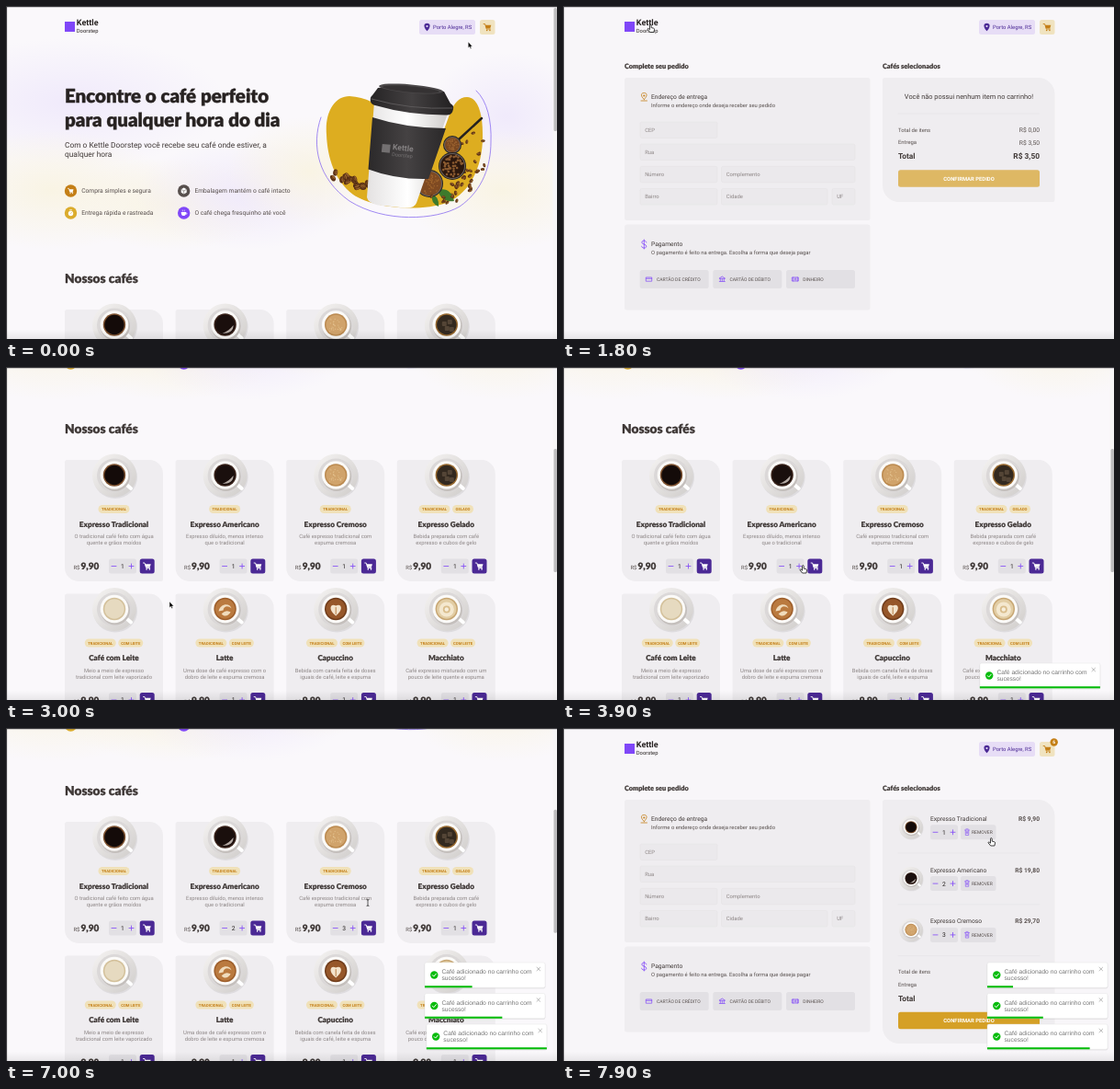
Write an HTML page that moves like this. It is 600 px wide and 362 px high and loops after 8000 ms.

```html
<!DOCTYPE html>
<html lang="pt-BR">
<head>
<meta charset="utf-8">
<title>Kettle Doorstep</title>
<style>
html, body { margin: 0; width: 100%; height: 100%; overflow: hidden; background: #faf8fb }
svg { display: block; width: 100vw; height: 100vh; font-family: Roboto, sans-serif; text-rendering: geometricPrecision }
text { white-space: pre }
.h { font-family: Lato, sans-serif; font-weight: 900; stroke: #272221; stroke-width: .02em; stroke-linejoin: round }
.b { font-weight: 700 }
.m { text-anchor: middle }
.e { text-anchor: end }
.toast text { font-family: "Liberation Sans", Arial, sans-serif }
</style>
</head>
<body>
<svg id="stage" viewBox="0 0 600 362"></svg>
<script>
const TITLE = '#272221', SUB = '#403937', TEXT = '#574f4d', LABEL = '#8d8686',
  PURPLE = '#8047f8', DEEP = '#4b2995', AMBER = '#c47f17', GOLD = '#dbac2c',
  CARD = '#efedf0', BUTTON = '#e2e0e4';

// Drawing helpers
const rect = (x, y, w, h, fill, r = 2.5, more = '') =>
  `<rect x="${x}" y="${y}" width="${w}" height="${h}" rx="${r}" fill="${fill}" ${more}/>`;
const text = (x, y, s, size, fill = TEXT, cls = '') =>
  `<text x="${x}" y="${y}" font-size="${size}" fill="${fill}" class="${cls}">${s}</text>`;
const oval = (x, y, rx, ry, fill, more = '') =>
  `<ellipse cx="${x}" cy="${y}" rx="${rx}" ry="${ry}" fill="${fill}" ${more}/>`;
const dot = (x, y, r, fill, more) => oval(x, y, r, r, fill, more);
const path = (d, fill, more = '') => `<path d="${d}" fill="${fill}" ${more}/>`;
const line = (d, color, w = .8) => path(d, 'none', `stroke="${color}" stroke-width="${w}" stroke-linecap="round" stroke-linejoin="round"`);
const group = (move, body, more = '') => `<g transform="${move}" ${more}>${body}</g>`;
const leafCard = (x, y, w, h, r) =>
  path(`M${x + 2.5} ${y}H${x + w - r}a${r} ${r} 0 0 1 ${r} ${r}V${y + h - 2.5}a2.5 2.5 0 0 1-2.5 2.5H${x + r}a${r} ${r} 0 0 1-${r}-${r}V${y + 2.5}a2.5 2.5 0 0 1 2.5-2.5z`, CARD);

let seed = 7;
const rnd = (a, b) => a + (b - a) * ((seed = seed * 16807 % 2147483647) / 2147483647);

// Icons, centred on x, y
const basket = (x, y, c, k = 1) => group(`translate(${x} ${y}) scale(${k})`,
  line('M-4.2-3.5h1.5l1.7 5.5h4', c, .9) + path('M-2.4-2.3h6.4l-1 3.6h-4.4z', c) +
  dot(-.6, 3.4, .8, c) + dot(2.6, 3.4, .8, c));
const pin = (x, y, c, hole) => path(`M${x} ${y + 4.2}c-4.2-4-4-8.4 0-8.4s4.2 4.4 0 8.4z`, c) + dot(x, y - 1, 1.1, hole);
const box = (x, y) => path(`M${x} ${y - 3.4}l3 1.7v3.4l-3 1.7-3-1.7v-3.4z`, '#fff') + line(`M${x - 2.8} ${y - 1.6}l2.8 1.6 2.8-1.6M${x} ${y}v3`, TEXT, .5);
const timer = (x, y) => dot(x, y + .5, 2.7, '#fff') + line(`M${x - 1} ${y - 3.2}h2`, '#fff') + line(`M${x} ${y + .5}l1-1.2`, GOLD, .6);
const mug = (x, y) => path(`M${x - 3} ${y - 1}h5.4c0 2.6-1 4-2 4h-1.4c-1 0-2-1.4-2-4z`, '#fff') +
  line(`M${x + 2.3} ${y}h1v1.2h-1.4M${x - 1.4} ${y - 3}v1M${x + .6} ${y - 3}v1`, '#fff', .6);

const logo = x => rect(x, 17, 11, 11, PURPLE, 0) + text(x + 12.8, 21.3, 'Kettle', 9, TITLE, 'b') + text(x + 12.8, 29.2, 'Doorstep', 5.8, TITLE);
const header = x => logo(x) +
  rect(x + 386, 15, 61, 16, '#e7ddf6') + pin(x + 394.5, 23, DEEP, '#e7ddf6') + text(x + 401, 25.2, 'Porto Alegre, RS', 5.86, DEEP) +
  rect(x + 452, 15, 16.5, 16, '#f0e3c0') + basket(x + 460.3, 23, AMBER) +
  `<g class="full">${dot(x + 467.7, 15.5, 4.2, AMBER) + text(x + 467.7, 17.2, '6', 5, '#fff', 'b m')}</g>`;

const counter = (x, y, n, id = '') => rect(x, y, 30, 16, BUTTON) +
  line(`M${x + 3} ${y + 8}h5M${x + 22} ${y + 8}h5m-2.5-2.5v5`, PURPLE, .8) +
  `<g ${id}>${text(x + 15, y + 10.4, n, 6.7, TITLE, 'm')}</g>`;

// Coffee seen from above: liquid, crema edge, surface detail
const art = {
  foam: () => Array.from({ length: 30 }, () => dot(rnd(-7, 7), rnd(-7, 7), .6, '#e2bf8c')).join(''),
  ice: () => [[-5, -4], [1, -6], [-2, 1], [3, 2]].map(([x, y]) => rect(x, y, 5, 5, '#86705a', 1, 'opacity=".4"')).join(''),
  heart: () => path('M0 7C-9 0-6-7 0-4 6-7 9 0 0 7z', '#f3e4cd') + line('M0 5v-7', '#b77a43', 1),
  swirl: () => path('M-7 2C-6-6 5-8 7-1 3-5-2-3-2 1z', '#f0dcbd') + path('M-4 5C1 0 4 2 6 3 3 8-1 8-4 5z', '#f0dcbd'),
  rings: () => dot(0, 0, 8, '#f4e8cf') + dot(0, 0, 4, '#d9bd8c') + dot(0, 0, 2.2, '#f7eedb'),
  shine: () => path('M9 0C9 6 5 9-3 9 2 7 6 4 9 0z', '#b5aaa4')
};
const coffee = (x, y, k, [liquid, edge, detail]) => group(`translate(${x} ${y}) scale(${k})`,
  oval(1, 2, 24, 23, '#000', 'opacity=".07"') + oval(0, 0, 24, 23.5, 'url(#dish)') +
  oval(0, 0, 19, 18.5, '#dbd8d8') + line('M11 8L18 14', '#fff', 4) + dot(1, 1, 16, '#c4bfbc') + dot(0, -.5, 15.3, '#fbfaf8') +
  dot(0, -.5, 12.2, edge) + dot(0, -.5, 10.7, liquid) + (detail ? art[detail]() : ''));

const milk = ['TRADICIONAL', 'COM LEITE'], plain = ['TRADICIONAL'];
const tagWidth = { TRADICIONAL: 34, 'COM LEITE': 27, GELADO: 23 };
const products = [
  ['Expresso Tradicional', 'O tradicional café feito com água', 'quente e grãos moídos', plain, ['#140b09', '#7d5231']],
  ['Expresso Americano', 'Expresso diluído, menos intenso', 'que o tradicional', plain, ['#1a0f0d', '#38221a', 'shine']],
  ['Expresso Cremoso', 'Café expresso tradicional com', 'espuma cremosa', plain, ['#d0a36b', '#bb8a50', 'foam']],
  ['Expresso Gelado', 'Bebida preparada com café', 'expresso e cubos de gelo', ['TRADICIONAL', 'GELADO'], ['#33291f', '#96682f', 'ice']],
  ['Café com Leite', 'Meio a meio de expresso', 'tradicional com leite vaporizado', milk, ['#e6dac0', '#d3c09a']],
  ['Latte', 'Uma dose de café expresso com o', 'dobro de leite e espuma cremosa', milk, ['#ba7a3f', '#9d5e2b', 'swirl']],
  ['Capuccino', 'Bebida com canela feita de doses', 'iguais de café, leite e espuma', milk, ['#96572a', '#6f3c1b', 'heart']],
  ['Macchiato', 'Café expresso misturado com um', 'pouco de leite quente e espuma', milk, ['#e2cda4', '#c7a673', 'rings']]
];

function product([name, l1, l2, tags, look], i) {
  const x = 64 + i % 4 * 120.6, y = 330 + (i > 3) * 145.5, c = x + 53.5;
  let left = c - (tags.reduce((w, t) => w + tagWidth[t], 0) + 2.5 * (tags.length - 1)) / 2;
  const pills = tags.map(t => {
    const w = tagWidth[t], pill = rect(left, y + 49, w, 9, '#f0e1b9', 4.5) + text(left + w / 2, y + 55, t, 4.2, AMBER, 'b m');
    left += w + 2.5;
    return pill;
  }).join('');
  return leafCard(x, y, 107, 132, 15) + coffee(c + .5, y + 17, 1, look) + pills +
    text(c, y + 72.8, name, 8.2, SUB, 'h m') +
    text(c, y + 85, l1, 5.86, LABEL, 'm') + text(c, y + 92.3, l2, 5.86, LABEL, 'm') +
    text(x + 9.5, y + 119, 'R$', 5.86) + text(x + 17.5, y + 119, '9,90', 10, SUB, 'h') +
    counter(x + 48, y + 107.5, 1, `id="qty${i}"`) +
    rect(x + 81.7, y + 107.5, 16, 16, DEEP) + basket(x + 89.7, y + 115.5, '#fff');
}

const bean = (x, y, k) => group(`translate(${x} ${y}) rotate(${rnd(0, 180)}) scale(${k})`,
  oval(0, 0, 3.6, 2.5, '#5f3417') + oval(-.3, -.6, 2.6, 1.3, '#a0682f') + line('M-3 .2q3-1.2 6 0', '#3b1d0d', .6));
const beans = (n, x0, y0, x1, y1, slope, k = 1) => Array.from({ length: n }, () => {
  const u = rnd(0, 1);
  return bean(x0 + u * (x1 - x0), y0 + rnd(0, y1 - y0) + u * slope, k);
}).join('');
const bowl = (x, y, r, base, grain, size) => dot(x, y, r, '#252120') + dot(x, y, r - 1, '#6d645f') + dot(x, y, r - 2, base) +
  Array.from({ length: 40 }, () => {
    const a = rnd(0, 6.28), d = (r - 3.5) * Math.sqrt(rnd(0, 1));
    return dot(x + d * Math.cos(a), y + d * Math.sin(a), size, grain);
  }).join('');

const hero = () =>
  path('M349 140C347 115 358 98 374 98 392 99 405 106 420 120L474 140C482 128 484 99 502 99 514 99 519 118 519 138 520 170 508 202 480 214 450 224 400 220 378 205 358 190 350 165 349 140z', '#ddad20') +
  line('M343 121C332 152 340 188 374 212 412 236 468 233 494 218 520 200 528 172 528 148 529 125 524 103 512 92', '#8a6cf0') +
  beans(20, 356, 177, 402, 188, 18) + beans(14, 484, 186, 508, 206, -4, .7) + beans(16, 496, 138, 522, 184, 0, .6) +
  line('M492 146L518 122', '#252120', 2.5) + bowl(486, 151, 10, '#7a4720', '#9a6230', .8) +
  path('M470 200q14-4 18 12-14 2-18-12zM464 205q8 2 7 13-9-4-7-13z', '#3d7a2c') +
  bowl(486, 174, 15, '#2c180e', '#8a5a30', 1.3) + bowl(461, 193, 15, '#7f4a22', '#a2672f', .8) + beans(7, 462, 206, 492, 214, 0, .6) +
  path('M401 104L393 208Q394 214 405 216.500L434 219.500Q445 220 447 214L482 114z', 'url(#paper)') +
  path('M399 121Q436 133 479 133L460 188Q425 189 394.500 177.500z', 'url(#sleeve)') +
  path('M405 89L399 97Q396 99 397 104 398 107 402 108 440 119 481 118.500 486 118 487 112 488 108 484 106L477 93Q440 84 405 89z', 'url(#lid)') +
  group('rotate(5 441 90)', oval(441, 90, 35, 4.6, '#4b4849') + oval(441, 90.6, 31, 3.2, '#353233')) +
  line('M398 101Q440 113 486 111', '#5c595a', 1) +
  group('translate(411 148) rotate(6)', rect(-1, 2, 9, 9, '#737071', 0) + text(10.500, 7, 'Kettle', 8.6, '#858283', 'b') + text(10.500, 14, 'Doorstep', 5.6, '#737071'));

const glow = (x, y, rx, ry, c) => oval(x, y, rx, ry, `url(#${c})`);
const feature = (x, y, c, icon, label) => dot(x, y, 6.7, c) + icon + text(x + 11.7, y + 2.4, label, 6.7);
const home = () =>
  glow(70, 105, 170, 70, 'lilac') + glow(50, 200, 130, 65, 'cream') + glow(180, 215, 120, 50, 'cream') +
  glow(260, 205, 120, 60, 'lilac') + glow(545, 120, 90, 70, 'lilac') + glow(540, 200, 110, 65, 'cream') + glow(330, 180, 90, 60, 'cream') +
  header(64) +
  text(64, 105, 'Encontre o café perfeito', 20.5, TITLE, 'h') + text(64, 131, 'para qualquer hora do dia', 20.5, TITLE, 'h') +
  text(64, 153.5, 'Com o Kettle Doorstep você recebe seu café onde estiver, a', 8.37, SUB) + text(64, 164.3, 'qualquer hora', 8.37, SUB) +
  feature(70.5, 201, AMBER, basket(70.5, 201, '#fff', .75), 'Compra simples e segura') +
  feature(193.7, 201, TEXT, box(193.7, 201), 'Embalagem mantém o café intacto') +
  feature(70.5, 225, GOLD, timer(70.5, 225), 'Entrega rápida e rastreada') +
  feature(193.7, 225, PURPLE, mug(193.7, 225), 'O café chega fresquinho até você') +
  hero() + text(64, 301, 'Nossos cafés', 13.7, SUB, 'h') + products.map(product).join('');

// Checkout page
const input = (x, y, w, label) => rect(x, y, w, 17.5, '#ebe9ec', 1.7, 'stroke="#e2e0e3" stroke-width=".5"') + text(x + 5.2, y + 10.8, label, 5.86, LABEL);
const method = (x, label, icon) => rect(x, 287, 75, 20, BUTTON) + group(`translate(${x + 10} 297)`, line(icon, PURPLE, .7)) + text(x + 18.3, 298.8, label, 5);
const rule = y => line(`M365 ${y}H519`, '#e1dfe2', .5);
const summary = (dy, items, total, fill) => group(`translate(0 ${dy})`,
  text(365, 136.6, 'Total de itens', 5.86) + text(519, 137.3, items, 6.7, TEXT, 'e') +
  text(365, 150, 'Entrega', 5.86) + text(519, 150.6, 'R$ 3,50', 6.7, TEXT, 'e') +
  text(365, 166, 'Total', 8.37, SUB, 'b') + text(519, 166, total, 8.37, SUB, 'b e') +
  rect(365, 178.3, 154, 18.5, fill) + text(442, 189.6, 'CONFIRMAR PEDIDO', 5.86, '#fff', 'b m'));
const cartItem = (i, price) => {
  const y = 78 + i * 55.8;
  return coffee(379, y + 30, .54, products[i][4]) + text(400, y + 22.7, products[i][0], 6.7, SUB) +
    text(519, y + 22.7, price, 6.7, TEXT, 'b e') + counter(400, y + 27.3, i + 1) + rect(433, y + 27.3, 38.5, 16, BUTTON) +
    line(`M437.500 ${y + 33}h5m-4.200 0v5.500h3.400v-5.500m-2.700-1.200h2m-1.600 2.800v2m1.200-2v2`, PURPLE, .6) +
    text(445, y + 37.2, 'REMOVER', 5) + rule(y + 58);
};
const checkout = () => header(67) +
  text(67, 68.4, 'Complete seu pedido', 7.35, SUB, 'h') + text(348, 68.4, 'Cafés selecionados', 7.35, SUB, 'h') +
  rect(67, 78, 267.5, 155, CARD) + rect(67, 237.5, 267.5, 93, CARD) +
  line('M88.300 101.500c-4-3.500-3.800-7 0-7s3.800 3.500 0 7zM85 103h6.500', AMBER, .8) + dot(88.3, 97.6, 1, AMBER) +
  text(96, 101.2, 'Endereço de entrega', 6.7, SUB) + text(96, 110.2, 'Informe o endereço onde deseja receber seu pedido', 5.86) +
  input(84, 126, 84, 'CEP') + input(84, 150, 234, 'Rua') + input(84, 174.3, 84, 'Número') + input(172.5, 174.3, 145.5, 'Complemento') +
  input(84, 198.5, 84, 'Bairro') + input(172.5, 198.5, 115.5, 'Cidade') + input(293, 198.5, 25, 'UF') +
  line('M90.800 257c0-2.600-5-2.600-5 0s5 1.600 5 4.200-5.200 2.600-5.200 0M88.300 254v10', PURPLE, .8) +
  text(96, 261.2, 'Pagamento', 6.7, SUB) + text(96, 270.4, 'O pagamento é feito na entrega. Escolha a forma que deseja pagar', 5.86) +
  method(83.7, 'CARTÃO DE CRÉDITO', 'M-3-2h6v4.200h-6zM-3-.7h6') +
  method(163.3, 'CARTÃO DE DÉBITO', 'M-3-1l3-2 3 2zM-2-.5v2.500M0-.5v2.500M2-.5v2.500M-3 2.500h6') +
  method(243, 'DINHEIRO', 'M-3.300-2h6.600v4h-6.600zM0-1a1 1 0 1 0 .1 0M-2.300-2v4M2.300-2v4') +
  `<g class="empty">${leafCard(348, 78, 187.5, 135, 18) + text(442, 101, 'Você não possui nenhum item no carrinho!', 7.4, SUB, 'm') +
    rule(117) + summary(0, 'R$ 0,00', 'R$ 3,50', '#deb864')}</g>` +
  `<g class="full">${leafCard(348, 78, 187.5, 265, 18) + ['R$ 9,90', 'R$ 19,80', 'R$ 29,70'].map((p, i) => cartItem(i, p)).join('') +
    summary(130.5, 'R$ 59,40', 'R$ 62,90', '#d5a026')}</g>`;

const toast = () => `<g class="toast">${rect(-.4, .5, 131.8, 28, '#000', 2.2, 'opacity=".07"') + rect(0, 0, 131, 27.3, '#fff', 1.7, 'stroke="#ddd" stroke-width=".4"') +
  dot(10.3, 13.5, 4.2, '#07bc0c') + line('M8.300 13.600l1.500 1.500 2.600-3', '#fff', 1) +
  text(18.5, 12, 'Café adicionado no carrinho com', 6.7, '#757575') + text(18.5, 19.3, 'sucesso!', 6.7, '#757575') +
  line('M122 5.200l3.600 3.600m0-3.600l-3.600 3.600', '#888', .6)}<rect y="25.200" height="2.100" fill="#07bc0c"/></g>`;

const radial = (id, c) => `<radialGradient id="${id}"><stop stop-color="${c}"/><stop offset="1" stop-color="${c}" stop-opacity="0"/></radialGradient>`;
const linear = (id, more, ...c) => `<linearGradient id="${id}" ${more}>${c.map((v, i) => `<stop offset="${i / (c.length - 1)}" stop-color="${v}"/>`).join('')}</linearGradient>`;
const down = 'x2="0" y2="1"';

stage.innerHTML = `<defs>${radial('lilac', '#f0eafb') + radial('cream', '#f9f4e4') +
  linear('dish', 'x2="1" y2="1"', '#f6f4f3', '#cfccca') + linear('paper', '', '#e4e2e2', '#fff', '#cfccca') +
  linear('sleeve', '', '#2b292a', '#454243', '#2a2829') + linear('lid', '', '#262425', '#434041', '#222021') +
  linear('fade', down, '#00000000', '#00000012')}</defs>
  ${rect(0, 0, 600, 362, '#faf8fb', 0)}
  <g id="home">${home()}</g>
  <g id="checkout">${rect(0, 0, 600, 362, '#f8f6f9', 0) + checkout()}</g>
  <g id="bar">${rect(595.5, 0, 4.5, 362, '#f7f6f7', 0)}<rect id="thumb" x="596.500" width="3.500" height="134" rx="1.500" fill="#bdbcbe"/></g>
  ${rect(0, 352, 600, 10, 'url(#fade)', 0)}
  ${toast().repeat(3)}
  ${rect(0, 0, 600, 1.2, '#3a393d', 0) + rect(0, 0, 1.1, 362, '#3a393d', 0)}
  <g id="cursor">
    <g>${path('M0 0v6.500l1.500-1.300 1 2.400 1.100-.5-1-2.200h2z', '#000', 'stroke="#fff" stroke-width=".4"')}</g>
    <g>${path('M-1.500-3.500a.8.800 0 0 1 1.700 0v2.600l2.500.6c.7.200.9.700.8 1.400l-.6 2.900h-4.200l-2.500-3c-.5-.8.400-1.400 1.100-.8l1.200 1z', '#fff', 'stroke="#111" stroke-width=".8"')}</g>
    <g>${line('M-1-3.500q1 0 1 .8 0-.8 1-.8M0-3v6M-1 3.500q1 0 1-.8 0 .8 1 .8', '#222', .7)}</g>
  </g>`;

// Timelines: [time, values...]
const scrollKeys = [[2400, 0], [2600, 62], [2800, 170], [3000, 229], [6900, 229], [7000, 228], [7250, 0]];
const cursorKeys = [[0, 503.3, 39], [400, 524, 24], [700, 524, 26], [1000, 450, 180], [1300, 260, 285], [1700, 96, 24.5], [2000, 96, 24.5],
  [2400, 203, 292], [2800, 203, 292], [3200, 153, 218], [3400, 153, 218], [3700, 262, 220], [4100, 262, 220], [4400, 274, 219], [4600, 274, 219],
  [5000, 379, 221], [5700, 379, 221], [6100, 394, 219], [6500, 394, 219], [6800, 394, 190], [7050, 394, 190], [7400, 526, 25], [7500, 526, 25], [7800, 467, 124]];
const cursorKinds = [[0, 0], [300, 1], [600, 0], [1600, 1], [2000, 0], [3100, 1], [6700, 2], [7100, 0], [7400, 1]];
const toastStarts = [3270, 4520, 6460];
const bounceKeys = [[0, 1256], [420, -10.5], [525, 4.2], [630, -2.1], [700, 0]];

function at(keys, t, ease = u => u) {
  const i = keys.findIndex(k => k[0] > t);
  if (i < 1) return keys.at(i).slice(1);
  const a = keys[i - 1], b = keys[i], u = ease((t - a[0]) / (b[0] - a[0]));
  return a.slice(1).map((v, j) => v + (b[j + 1] - v) * u);
}
const easeOut = u => 1 - (1 - u) ** 3;
const $ = s => document.querySelector(s), all = s => [...document.querySelectorAll(s)];
const show = (el, on) => el.style.display = on ? '' : 'none';
const move = (el, x, y) => el.setAttribute('transform', `translate(${x} ${y})`);
const toasts = all('.toast'), kinds = [...$('#cursor').children];
const setQty = (i, n) => $(`#qty${i} text`).textContent = n;

function frame() {
  const t = Math.floor(performance.now() % 8000 / 100) * 100;
  const atCheckout = t >= 500 && t < 2000 || t >= 7500, full = t >= 3300;
  const [scroll] = at(scrollKeys, t);
  show($('#home'), !atCheckout);
  show($('#checkout'), atCheckout);
  show($('#bar'), !atCheckout);
  all('.full').forEach(el => show(el, full));
  all('.empty').forEach(el => show(el, !full));
  move($('#home'), 0, -scroll);
  $('#thumb').setAttribute('y', 2 + scroll * .38);
  setQty(1, t < 4000 ? 1 : 2);
  setQty(2, t < 5100 ? 1 : t < 5600 ? 2 : 3);

  const shown = toastStarts.filter(s => t >= s).length;
  toasts.forEach((el, i) => {
    const age = t - toastStarts[i];
    show(el, age >= 0);
    if (age < 0) return;
    move(el, (atCheckout ? 462 : 456) + at(bounceKeys, age, easeOut)[0], 322 - 33.5 * (shown - 1 - i));
    el.lastChild.setAttribute('width', 131 * Math.min(1, 1 - (age - 700) / 5000));
  });

  move($('#cursor'), ...at(cursorKeys, t));
  const kind = cursorKinds.findLast(k => t >= k[0])[1];
  kinds.forEach((el, i) => show(el, i === kind));
  requestAnimationFrame(frame);
}
frame();
</script>
</body>
</html>
```
